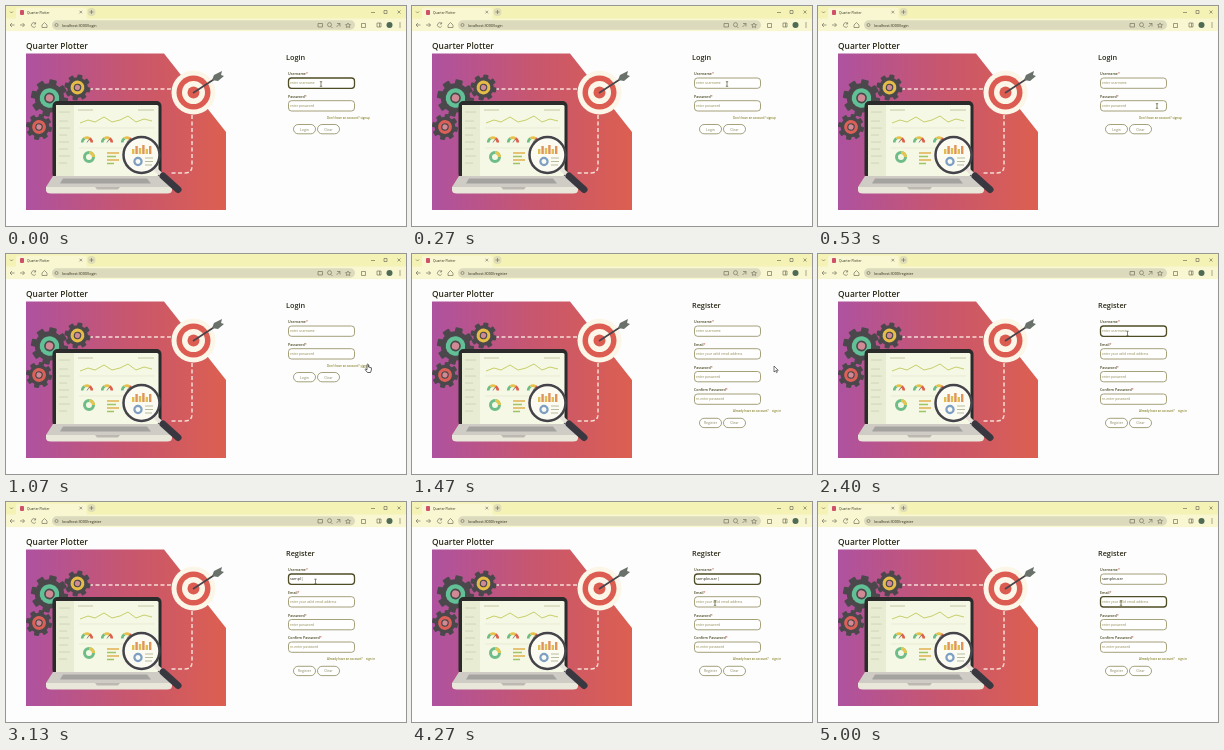
Recreate the animation shown at these times as an HTML page. Size 400 px wide and 220 px high, loop 5.07 s.

```html
<!DOCTYPE html>
<html lang="en">
<head>
<meta charset="utf-8">
<title>Quarter Plotter</title>
<style>
html, body { margin: 0; width: 100%; height: 100%; overflow: hidden; background: #fdfdfd; }
svg { display: block; width: 100%; height: 100%; }
text { font-family: "Open Sans", "Noto Sans", sans-serif; fill: #2b2a16; }
.head { font-weight: 600; }
.label { font-size: 3.6px; font-weight: 600; fill: #47451f; }
.hint { font-size: 3.3px; fill: #8f8b50; }
.typed { font-size: 3.9px; }
.link { font-size: 2.9px; font-weight: 600; fill: #8a852c; }
.button { font-size: 3.5px; text-anchor: middle; fill: #8a8760; }
.line { fill: none; stroke: #77755f; stroke-width: .7; }
.box { fill: #fff; stroke: #8d8a5a; stroke-width: .8; }
.focus { stroke: #4f4d25; stroke-width: 1.3; }
</style>
</head>
<body>
<svg viewBox="0 0 400 220">
  <defs>
    <linearGradient id="sunset">
      <stop offset="0" stop-color="#ae52a0"/>
      <stop offset=".5" stop-color="#c7566f"/>
      <stop offset="1" stop-color="#dc5f50"/>
    </linearGradient>
  </defs>
  <rect width="400" height="220" fill="#fdfdfd"/>

  <!-- browser -->
  <rect width="400" height="13" fill="#f4f2b4"/>
  <path d="M8 13Q10 13 10 10V4Q10 1.500 12.500 1.500H78Q80.500 1.500 80.500 4V10Q80.500 13 83 13Z" fill="#f8f7d2"/>
  <rect y="12.500" width="400" height="12.700" fill="#f8f7d2"/>
  <rect x="46" y="14.300" width="303" height="9.400" rx="4.700" fill="#dcdabd"/>
  <rect x="14" y="4" width="4" height="5" rx="1" fill="#cf5068"/>
  <text x="21" y="7.700" font-size="3.200">Quarter Plotter</text>
  <circle cx="85.500" cy="6" r="4" fill="#dfddb8"/>
  <g class="line">
    <path d="M4 5.500l1.500 1.500 1.500-1.500M73.500 4.800l2.600 2.600m0-2.600l-2.600 2.600M83.500 6h4m-2-2v4M365 6.500h4M378 4.500h3v3h-3zM391.500 4.500l3 3m0-3l-3 3"/>
    <path d="M8.500 19H4m2-2l-2 2 2 2M14 19h4.500m-2-2l2 2-2 2M29.500 17.500a2.300 2.300 0 1 0 .3 2.500m-.2-3.700v1.700h-1.700M36 19l2.500-2.500L41 19v2.500h-5z"/>
    <circle cx="50.500" cy="19" r="1.500"/>
    <path d="M312 17.500h4.500v3.500h-4.500zM325 20.500l1.500 1.500M330.500 21l3.500-3.500M331 17.500h3v3M342 17l.8 1.500 1.700.2-1.200 1.200.3 1.600-1.600-.8-1.600.8.300-1.600-1.200-1.200 1.700-.2z"/>
    <path d="M355.500 17.500h4V21.500h-4zM371 17h4v4h-4zM373.500 17v4"/>
    <circle cx="323.500" cy="18.700" r="2"/>
  </g>
  <circle cx="383.500" cy="19" r="3" fill="#4f6a55"/>
  <path d="M394 16.500v1m0 1v1m0 1v1" stroke="#55533f"/>
  <text id="url" x="56" y="20.500" font-size="3.700"></text>
  <text class="head" x="20" y="43" font-size="8.400">Quarter Plotter</text>

  <!-- illustration -->
  <path d="M20 47.500H158L220 126V204H20Z" fill="url(#sunset)"/>
  <path d="M83 83H166M186 109V160Q186 167 179 167H163" fill="none" stroke="#f6dcd6" stroke-width="1.500" stroke-dasharray="4 2.500"/>
  <g id="gears"></g>
  <g id="target"></g>
  <path d="M187 87L213 70" stroke="#46454b" stroke-width="1.600"/>
  <path d="M206 74l2-5 8-4-1 4 3 1-6 5z" fill="#69716a"/>

  <rect x="46.500" y="95" width="109" height="78" rx="5" fill="#2b2b2b"/>
  <rect x="50" y="99" width="102.500" height="71" rx="1.500" fill="#f6f8e6"/>
  <path d="M50 99h18v71H50z" fill="#e8ecd2"/>
  <path d="M53 106h11m-11 9h9m-9 7h11m-11 7h8m-8 7h10m-10 7h9m-9 7h11m-11 7h8" stroke="#d0d4b8"/>
  <path d="M72 104h15m45 0h16" stroke="#c6c8a5"/>
  <path d="M73 122H148M73 142h75" stroke="#e2e2c8" stroke-width=".600"/>
  <path d="M74 117l8-3 7 2 9-5 8 5 8-2 8-4 8 6 8-3 8 2" fill="none" stroke="#c6cf68"/>
  <g id="gauges"></g>
  <g fill="none" stroke-width="3">
    <circle cx="83" cy="151" r="4.500" stroke="#6ebd88"/>
    <path d="M83 146.500a4.500 4.500 0 0 1 4.500 4.500" stroke="#e6c64d"/>
  </g>
  <path d="M101 147h12m-12 7h12" stroke="#dfb04f" stroke-width="1.700"/>
  <path d="M101 150.500h9m-9 7h7" stroke="#9fc465" stroke-width="1.700"/>
  <path d="M47 170H156L165 181H40Z" fill="#cfccc6"/>
  <path d="M57 172.500h84l4 5H54z" fill="#a5a39f"/>
  <path d="M40 181H166V184Q166 187.500 161 187.500H45Q40 187.500 40 184Z" fill="#e9e7da"/>
  <path d="M89 181h25l-2 2.500H91z" fill="#bdb9b2"/>

  <path d="M148 162L155 168.500" stroke="#e8e4dc" stroke-width="4"/>
  <path d="M157 170L172 183.500" stroke="#39373f" stroke-width="7" stroke-linecap="round"/>
  <circle cx="135.500" cy="149" r="18" fill="#fbfbf2" stroke="#44434a" stroke-width="2.500"/>
  <g id="bars"></g>
  <circle cx="132" cy="155.500" r="3.600" fill="none" stroke="#7d9fc4" stroke-width="2.200"/>
  <path d="M139 152h8m-8 3.500h8m-8 3.500h7" stroke="#b9bda0"/>

  <g id="form"></g>
  <g id="pointer"></g>
</svg>
<script>
const LOOP = 5070, REGISTER_AT = 1130, NAME = "sampleuser";
const $ = id => document.getElementById(id);
const clamp = v => Math.max(0, Math.min(1, v));
const text = (kind, x, y, s) => `<text class="${kind}" x="${x}" y="${y}">${s}</text>`;
const circle = (x, y, r, fill) => `<circle cx="${x}" cy="${y}" r="${r}" fill="${fill}"/>`;

function gear(x, y, r, color) {
  let teeth = "";
  for (let a = 0; a < 360; a += 45)
    teeth += `<rect x="${-r * .2}" y="${-r}" width="${r * .4}" height="${r * .4}" rx="1" transform="rotate(${a})"/>`;
  return `<g transform="translate(${x} ${y}) rotate(12)" fill="#4b484c">${teeth}` +
    circle(0, 0, r * .79, "#4b484c") + circle(0, 0, r * .53, color) +
    circle(0, 0, r * .29, "#4b484c") + circle(0, 0, r * .2, "#d08a94") + "</g>";
}
$("gears").innerHTML = gear(43.5, 92, 18.5, "#62c096") +
  gear(71.5, 81.5, 13, "#e6bc48") + gear(33, 121, 13, "#dc6058");

$("target").innerHTML = [22, 17, 11.5, 6]
  .map((r, i) => circle(187.5, 86.5, r, i % 2 ? "#dc5c52" : "#fbf6e8")).join("");

const arc = (x, from, to, color) => {
  const p = a => `${x + 4.8 * Math.cos(a * Math.PI)} ${136.5 - 4.8 * Math.sin(a * Math.PI)}`;
  return `<path d="M${p(from)}A4.8 4.8 0 0 1 ${p(to)}" fill="none" stroke="${color}" stroke-width="2.6"/>`;
};
$("gauges").innerHTML = [81, 101, 121].map(x =>
  arc(x, 1, .67, "#6bbd84") + arc(x, .67, .33, "#e6c24a") + arc(x, .33, 0, "#dc604d") +
  `<path d="M${x} 136.5l2-3" stroke="#5c594b" stroke-width=".7"/>`).join("");

$("bars").innerHTML = [5, 8, 6, 9, 5, 8].map((h, i) =>
  `<rect x="${126 + i * 3.4}" y="${148 - h}" width="2.4" height="${h}" fill="${i % 2 ? "#e0935b" : "#e2bd4f"}"/>`).join("");

function field(y, label, hint, focused, value = "") {
  return text("label", 282, y - 2.7, label + '<tspan fill="#c65346">*</tspan>') +
    `<rect class="box ${focused ? "focus" : ""}" x="282.5" y="${y}" width="66" height="10.300" rx="3"/>` +
    (value ? text("typed", 284, y + 6.4, value + (focused ? "|" : "")) : text("hint", 284, y + 6.3, hint));
}
function button(x, y, label) {
  return `<rect class="box" x="${x}" y="${y}" width="22" height="9.300" rx="4.650"/>` +
    text("button", x + 11, y + 6, label);
}
const heading = s => `<text class="head" x="280" y="54" font-size="7.300">${s}</text>`;

function login(t) {
  const hover = t > 900 ? ' text-decoration="underline"' : "";
  return heading("Login") +
    field(72, "Username", "enter username", t < 130) +
    field(94.7, "Password", "enter password", false) +
    text("link", 321, 112.6, "Don't have an account?") +
    text("link", 354.5, 112.6, `<tspan${hover}>signup</tspan>`) +
    button(287.5, 118.5, "Login") + button(311.5, 118.5, "Clear");
}

function register(t) {
  const name = NAME.slice(0, Math.ceil(clamp((t - 2550) / 1300) * NAME.length));
  return heading("Register") +
    field(72, "Username", "enter username", t > 1800 && t < 4750, name) +
    field(94.7, "Email", "enter your valid email address", t >= 4750) +
    field(117.5, "Password", "enter password", false) +
    field(140, "Confirm Password", "re-enter password", false) +
    text("link", 321, 157.7, "Already have an account?") +
    text("link", 360, 157.7, "sign in") +
    button(287.5, 164.3, "Register") + button(311.5, 164.3, "Clear");
}

// time, x, y
const path = [[0, 315, 78], [270, 315, 78], [530, 339, 100], [670, 339, 100], [930, 362, 114],
  [1530, 362, 114], [1870, 309.5, 79.5], [3930, 309.5, 79.5], [4200, 303, 101], [LOOP, 303, 101]];

function pointer(t) {
  const i = path.findIndex(p => p[0] > t), [t0, x0, y0] = path[i - 1], [t1, x1, y1] = path[i];
  const u = (t - t0) / (t1 - t0), e = u * u * (3 - 2 * u);
  const x = x0 + (x1 - x0) * e, y = y0 + (y1 - y0) * e;
  const hand = t > 870 && t < REGISTER_AT;
  const onField = x < 349 && [77, 100, 123, 145].some(c => Math.abs(y - c) < 5);
  const shape = hand
    ? '<path d="M-1 0V-3.500q.7-.8 1.400 0V-1l3 .8V2L2.500 4.500H-.500L-3 1.500q0-1 2 .2z" fill="#fff" stroke="#222" stroke-width=".700"/>'
    : onField
      ? '<path d="M-1.200-2.300h2.400M0-2.300V2.300m-1.200 0h2.400" fill="none" stroke="#55532f" stroke-width=".700"/>'
      : '<path d="M0-2V4l1.500-1.300 1 2 .9-.5-1-1.900H4.300z" fill="#fff" stroke="#222" stroke-width=".600"/>';
  return `<g transform="translate(${x} ${y})">${shape}</g>`;
}

function draw(now) {
  const t = now % LOOP, page = t < REGISTER_AT ? "login" : "register";
  $("url").textContent = "localhost:3000/" + page;
  $("form").innerHTML = page === "login" ? login(t) : register(t);
  $("pointer").innerHTML = pointer(t);
}

let start;
function tick(now) {
  start ??= now;
  draw(now - start);
  requestAnimationFrame(tick);
}
draw(0);
requestAnimationFrame(tick);
</script>
</body>
</html>
```
